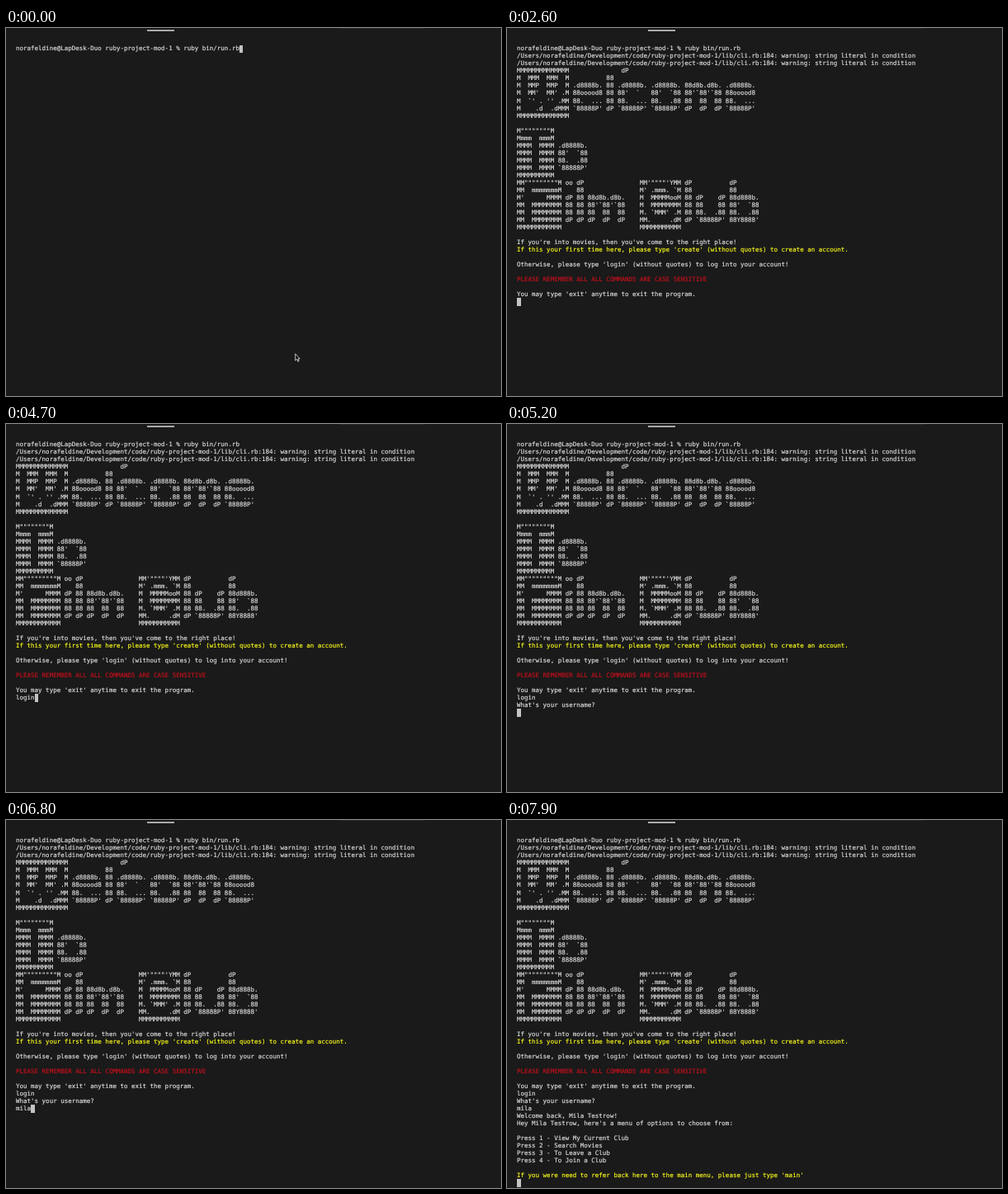
Recreate the animation shown at these times as an HTML page. Size 600 by 446 pixels, loop 8 s.

```html
<!DOCTYPE html>
<html lang="en">
<head>
<meta charset="utf-8">
<title>Terminal session</title>
<style>
  html, body { margin: 0; width: 100%; height: 100%; overflow: hidden; background: #1a1a1a; }
  pre {
    position: absolute; left: 12px; top: 20.4px; margin: 0;
    font: 7.5px/9.02px "DejaVu Sans Mono", monospace;
    text-rendering: geometricPrecision;
    -webkit-text-stroke: .15px;
    color: #e0e0e0;
  }
  .yellow { color: #ffff1a; }
  .red { color: #c8101c; }
  #cursor { position: relative; top: .3px; padding-bottom: .3px; background: #c4c4c4; }
  .bar { position: absolute; }
  #tab { left: 170.5px; top: 2px; width: 33px; height: 2px; background: #aaa; }
  #edge { left: 403px; top: 0; width: 105px; height: 1px; background: #282828; }
  #pointer { position: absolute; left: 350px; top: 394px; }
</style>
</head>
<body>
<div class="bar" id="tab"></div>
<div class="bar" id="edge"></div>
<pre>norafeldine@LapDesk-Duo ruby-project-mod-1 % ruby bin/run.rb<span data-at="1000">
</span><span data-at="2600">/Users/norafeldine/Development/code/ruby-project-mod-1/lib/cli.rb:184: warning: string literal in condition
/Users/norafeldine/Development/code/ruby-project-mod-1/lib/cli.rb:184: warning: string literal in condition
MMMMMMMMMMMMMM              dP
M  MMM  MMM  M          88
M  MMP  MMP  M .d8888b. 88 .d8888b. .d8888b. 88d8b.d8b. .d8888b.
M  MM'  MM' .M 88ooood8 88 88'  `   88'  `88 88'`88'`88 88ooood8
M  `' . '' .MM 88.  ... 88 88.  ... 88.  .88 88  88  88 88.  ...
M    .d  .dMMM `88888P' dP `88888P' `88888P' dP  dP  dP `88888P'
MMMMMMMMMMMMMM

M""""""""M
Mmmm  mmmM
MMMM  MMMM .d8888b.
MMMM  MMMM 88'  `88
MMMM  MMMM 88.  .88
MMMM  MMMM `88888P'
MMMMMMMMMM
MM"""""""""M oo dP               MM'""""'YMM dP          dP
MM  mmmmmmmM    88               M' .mmm. `M 88          88
M'      MMMM dP 88 88d8b.d8b.    M  MMMMMooM 88 dP    dP 88d888b.
MM  MMMMMMMM 88 88 88'`88'`88    M  MMMMMMMM 88 88    88 88'  `88
MM  MMMMMMMM 88 88 88  88  88    M. `MMM' .M 88 88.  .88 88.  .88
MM  MMMMMMMM dP dP dP  dP  dP    MM.     .dM dP `88888P' 88Y8888'
MMMMMMMMMMMM                     MMMMMMMMMMM

If you're into movies, then you've come to the right place!
<span class="yellow">If this your first time here, please type 'create' (without quotes) to create an account.</span>

Otherwise, please type 'login' (without quotes) to log into your account!

<span class="red">PLEASE REMEMBER ALL ALL COMMANDS ARE CASE SENSITIVE</span>

You may type 'exit' anytime to exit the program.
</span><span data-keys="3900 4100 4200 4400 4500">login</span><span data-at="5000">
What's your username?
</span><span data-keys="6300 6400 6600 6700">mila</span><span data-at="6900">
Welcome back, Mila Testrow!
Hey Mila Testrow, here's a menu of options to choose from:

Press 1 - View My Current Club
Press 2 - Search Movies
Press 3 - To Leave a Club
Press 4 - To Join a Club

<span class="yellow">If you were need to refer back here to the main menu, please just type 'main'</span>
</span><span id="cursor">&nbsp;</span></pre>
<svg id="pointer" width="8" height="12">
  <path d="M.7 .8V9L2.6 7.3L3.9 10.3L5.1 9.8L3.9 6.9H6.2Z" fill="#111" stroke="#e8e8e8" stroke-width=".8"/>
</svg>
<script>
  const LOOP = 8000, POINTER_HIDES = 900;
  const pointer = document.getElementById("pointer");
  const outputs = [...document.querySelectorAll("[data-at]")];
  const inputs = [...document.querySelectorAll("[data-keys]")].map(el => ({
    el, word: el.textContent, keys: el.dataset.keys.split(" ").map(Number)
  }));

  function render(now) {
    const t = now % LOOP;
    for (const el of outputs) el.hidden = t < el.dataset.at;
    for (const { el, word, keys } of inputs)
      el.textContent = word.slice(0, keys.filter(key => t >= key).length);
    pointer.style.display = t < POINTER_HIDES ? "" : "none";
  }

  function tick() {
    render(performance.now());
    requestAnimationFrame(tick);
  }
  tick();
</script>
</body>
</html>
```
